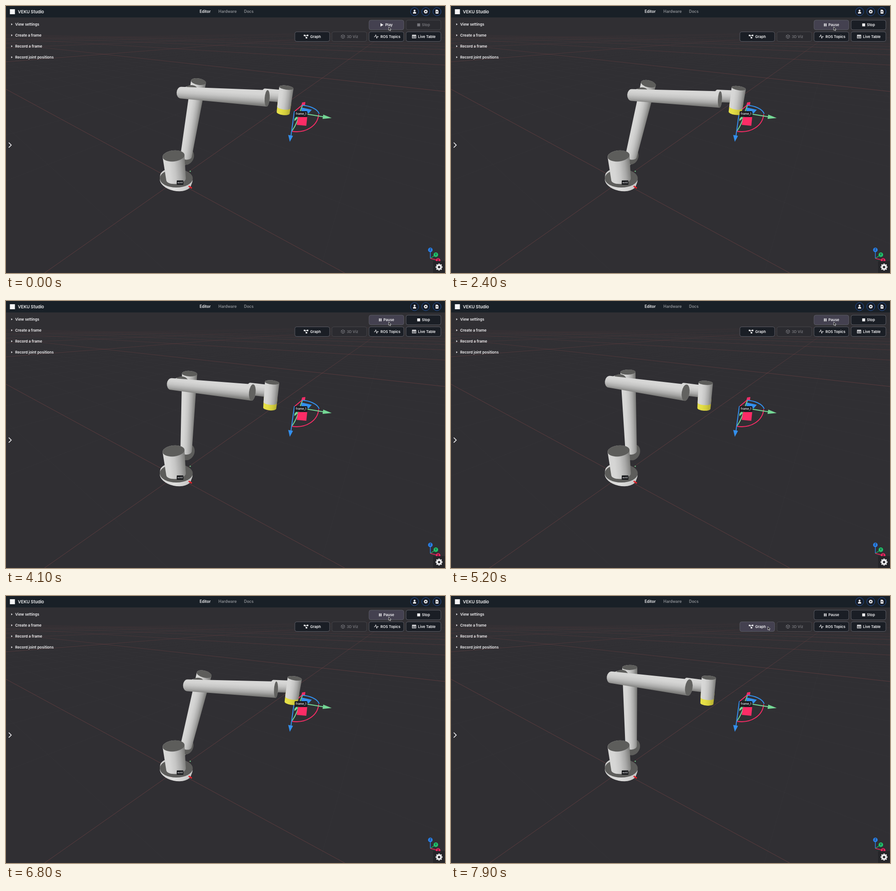
These frames come from a looping animation (959x584 px, 8 s). An HTML page with a canvas:

```html
<!DOCTYPE html>
<html lang="en">
<head>
<meta charset="utf-8">
<title>Robot arm viewer</title>
<style>
html, body { margin: 0; width: 100%; height: 100%; overflow: hidden; background: #302f33; }
canvas { display: block; width: 959px; height: 584px; }
</style>
</head>
<body>
<canvas id="stage"></canvas>
<script>
const W = 959, H = 584, LOOP = 8000, START = 1800;
const canvas = document.getElementById('stage');
const ctx = canvas.getContext('2d');
const dpr = window.devicePixelRatio || 1;
canvas.width = W * dpr;
canvas.height = H * dpr;

const WHITE = '#f4f4f6', DARK = '#1a1e25', CAP = '#5d5d5b';
const PINK = '#fb2c66', BLUE = '#3390ee', GREEN = '#74d795';
const GREY_STOPS = ['#7c7c7a', '#a9a9a8', '#c6c6c5', '#d5d5d4', '#d8d8d7'];
const YELLOW_STOPS = ['#b3ac33', '#d3cd3c', '#e4de46', '#e8e24a'];

// Sway of the arm: [time, x of the forearm's left edge]
const SWAY = [[1800, 373], [2950, 396], [3200, 393], [4100, 352], [4400, 341],
  [4780, 328], [5200, 337], [6420, 396], [6800, 387], [7900, 341], [8000, 337]];

// Joint positions at three sway values, blended by a parabola
const KEYS = [337, 373, 393];
const POSES = {
  elbow: [[345.5, 176.5], [382, 189.5], [402, 198]],
  wrist: [[512.5, 200.5], [570.5, 202], [597.5, 206.5]],
  linkTop: [[386.5, 155.5], [420.5, 165.5], [438, 173.5]],
  toolTop: [[556.5, 179], [612.5, 178.5], [638, 181]],
  toolEnd: [[552.5, 235], [605.5, 233.5], [629.5, 233]],
  caps: [[8.5, 5.5], [5.5, 7], [3.8, 8]],
  shoulder: [[398, 331], [395.5, 330], [394, 329]]
};

function swayAt(t) {
  if (t <= START) return SWAY[0][1];
  const slope = i => (SWAY[i + 1][1] - SWAY[i][1]) / (SWAY[i + 1][0] - SWAY[i][0]);
  const tangent = i => {
    if (i === 0) return 0;
    if (i === SWAY.length - 1) return slope(i - 1);
    const a = slope(i - 1), b = slope(i);
    return a * b <= 0 ? 0 : (a + b) / 2;
  };
  let i = 0;
  while (i < SWAY.length - 2 && t > SWAY[i + 1][0]) i++;
  const [t0, x0] = SWAY[i], [t1, x1] = SWAY[i + 1];
  const d = t1 - t0, s = (t - t0) / d, s2 = s * s, s3 = s2 * s;
  return (2 * s3 - 3 * s2 + 1) * x0 + (s3 - 2 * s2 + s) * d * tangent(i)
    + (3 * s2 - 2 * s3) * x1 + (s3 - s2) * d * tangent(i + 1);
}

function poseAt(x) {
  const weights = KEYS.map((k, i) => KEYS.reduce(
    (w, m, j) => i === j ? w : w * (x - m) / (k - m), 1));
  const pose = {};
  for (const name in POSES) {
    pose[name] = [0, 1].map(c => weights.reduce((sum, w, i) => sum + w * POSES[name][i][c], 0));
  }
  return pose;
}

const mix = (a, b, s) => [a[0] + (b[0] - a[0]) * s, a[1] + (b[1] - a[1]) * s];
const shift = (p, dx, dy) => [p[0] + dx, p[1] + dy];

function ellipse(p, rx, ry, color, angle = 0) {
  ctx.beginPath();
  ctx.ellipse(p[0], p[1], rx, ry, angle, 0, Math.PI * 2);
  ctx.fillStyle = color;
  ctx.fill();
}

function poly(color, ...points) {
  ctx.beginPath();
  points.forEach(p => ctx.lineTo(p[0], p[1]));
  ctx.closePath();
  ctx.fillStyle = color;
  ctx.fill();
}

function line(color, width, ...points) {
  ctx.beginPath();
  points.forEach(p => ctx.lineTo(p[0], p[1]));
  ctx.strokeStyle = color;
  ctx.lineWidth = width;
  ctx.stroke();
}

function curve(color, a, c, d, b) {
  ctx.beginPath();
  ctx.moveTo(...a);
  ctx.bezierCurveTo(...c, ...d, ...b);
  ctx.strokeStyle = color;
  ctx.lineWidth = 2;
  ctx.stroke();
}

function box(x, y, w, h, r, fill, stroke) {
  ctx.beginPath();
  ctx.roundRect(x, y, w, h, r);
  ctx.fillStyle = fill;
  ctx.fill();
  if (stroke) {
    ctx.strokeStyle = stroke;
    ctx.lineWidth = 1;
    ctx.stroke();
  }
}

function text(str, x, y, size, color = WHITE, align = 'left', weight = 600) {
  ctx.font = `${weight} ${size}px Inter, "Open Sans", sans-serif`;
  ctx.textAlign = align;
  ctx.textBaseline = 'middle';
  ctx.fillStyle = color;
  ctx.fillText(str, x, y);
}

// Cylinder from a to b: r is the half width, k the depth of the end ellipse
function cylinder(a, ra, ka, b, rb, kb, cap, stops = GREY_STOPS) {
  const angle = Math.atan2(b[1] - a[1], b[0] - a[0]);
  const m = mix(a, b, 0.5), r = (ra + rb) / 2;
  // Shade from the right or lower side to the lit left or upper side
  const side = Math.cos(angle) > 0.7 ? -1 : 1;
  const nx = -Math.sin(angle) * r * side, ny = Math.cos(angle) * r * side;
  const shade = ctx.createLinearGradient(m[0] - nx, m[1] - ny, m[0] + nx, m[1] + ny);
  stops.forEach((c, i) => shade.addColorStop(i / (stops.length - 1), c));
  ctx.beginPath();
  ctx.ellipse(a[0], a[1], ka, ra, angle, Math.PI / 2, Math.PI * 1.5);
  ctx.ellipse(b[0], b[1], kb, rb, angle, -Math.PI / 2, Math.PI / 2);
  ctx.closePath();
  ctx.fillStyle = shade;
  ctx.fill();
  if (cap) ellipse(a, ka, ra, cap, angle);
}

function drawGrid() {
  const horizon = 57;
  const fade = rgb => {
    const g = ctx.createLinearGradient(0, horizon, 0, 200);
    g.addColorStop(0, `rgba(${rgb},0.05)`);
    g.addColorStop(0.3, `rgba(${rgb},0.6)`);
    g.addColorStop(1, `rgba(${rgb},1)`);
    return g;
  };
  const family = (vx, x0, step, from, to, color, width) => {
    for (let i = from; i <= to; i++) line(color, width, [vx, horizon], [x0 + step * i, H]);
  };
  ctx.globalAlpha = 0.014;
  const minor = fade('255,255,255');
  family(-230, 740, 385, -2, 50, minor, 1);
  family(834, 84, 600.6, -45, 30, minor, 1);
  ctx.globalAlpha = 0.38;
  const major = fade('178,78,78');
  family(-230, 740, 3850, 0, 6, major, 0.85);
  family(834, 84, 6006, -5, 2, major, 0.85);
  ctx.globalAlpha = 1;
}

function drawFrameHandle() {
  line(PINK, 2, [649, 215], [631, 230]);
  poly(PINK, [647, 211], [654, 210], [653, 217], [645, 218]);
  curve(GREEN, [648, 217], [640, 232], [640, 252], [625, 273]);
  curve(BLUE, [647, 217], [662, 218], [681, 225], [684, 236]);
  curve(PINK, [683, 237], [681, 262], [655, 279], [624, 274]);
  poly(BLUE, [646, 222], [668, 227], [661, 235], [645, 231]);
  poly(GREEN, [630, 247], [637, 239], [637, 246], [630, 252]);
  poly(PINK, [638, 243], [658, 243], [656, 262], [635, 260]);
  line(BLUE, 2, [630, 230], [622.5, 284]);
  poly(BLUE, [616.5, 282], [627, 284], [620, 297]);
  line(GREEN, 2, [652, 235.5], [694, 242.5]);
  poly(GREEN, [693, 237.5], [711.5, 245], [691.5, 247]);
}

function drawArm(p) {
  cylinder([372, 377], 36, 20, [370.5, 384], 35, 20.5, null, ['#c6c6c5', '#dededd', '#cfcfce']);
  ellipse([372, 377], 36, 20, CAP);
  line('#e3222c', 3, [399, 394], [406, 398.5]);
  ellipse([402.5, 361.5], 1.3, 1.3, '#6fd08f');

  ellipse([389, 341], 5, 8, '#cfcfce');
  ellipse(p.shoulder, 14.5, 18, CAP, 0.45);
  cylinder(p.linkTop, 16.5, p.caps[1], [393.5, 328], 12.5, 8, CAP);
  cylinder([366, 328], 24, 12, [371.5, 379], 21.5, 10, CAP);

  ellipse(shift(p.elbow, 16, -3), 11, 11, '#d4d4d3');
  ellipse(shift(p.elbow, 23, -4), 15, 12.5, CAP);

  drawFrameHandle();
  cylinder(shift(p.wrist, -6, -8), 13.5, 6.5, mix(p.toolTop, p.toolEnd, 0.35), 13.5, 4);
  cylinder(p.wrist, 18, p.caps[0], p.elbow, 12.8, 9.3, '#626260');
  cylinder(mix(p.toolTop, p.toolEnd, 0.6), 15, 4, p.toolEnd, 14.3, 5, null, YELLOW_STOPS);
  cylinder(p.toolTop, 15.7, 4.5, mix(p.toolTop, p.toolEnd, 0.79), 14.6, 4.5, CAP);
}

function gear(x, y, r, hole) {
  ellipse([x, y], r * 0.76, r * 0.76, WHITE);
  for (let i = 0; i < 4; i++) {
    const a = i * Math.PI / 4, c = Math.cos(a) * r, s = Math.sin(a) * r;
    line(WHITE, r * 0.42, [x - c, y - s], [x + c, y + s]);
  }
  ellipse([x, y], r * 0.34, r * 0.34, hole);
}

const ICONS = {
  play(x, y, c) { poly(c, [x - 3, y - 3.7], [x + 3.5, y], [x - 3, y + 3.7]); },
  pause(x, y, c) {
    ctx.fillStyle = c;
    ctx.fillRect(x - 2.7, y - 3.2, 2, 6.4);
    ctx.fillRect(x + 0.7, y - 3.2, 2, 6.4);
  },
  stop(x, y, c) {
    ctx.fillStyle = c;
    ctx.fillRect(x - 3.2, y - 3.2, 6.4, 6.4);
  },
  graph(x, y, c) {
    line(c, 1, [x - 3, y - 2.3], [x + 3, y - 2.3]);
    line(c, 1, [x - 3, y - 2.3], [x + 1, y + 2.7]);
    ctx.fillStyle = c;
    [[-5, -4], [1.5, -4], [-0.8, 1]].forEach(([dx, dy]) => ctx.fillRect(x + dx, y + dy, 3.4, 3.2));
  },
  cube(x, y, c) {
    line(c, 1, [x, y - 4], [x + 3.7, y - 2], [x + 3.7, y + 2.2], [x, y + 4.2],
      [x - 3.7, y + 2.2], [x - 3.7, y - 2], [x, y - 4]);
    line(c, 1, [x - 3.7, y - 2], [x, y], [x + 3.7, y - 2]);
    line(c, 1, [x, y], [x, y + 4.2]);
  },
  pulse(x, y, c) {
    line(c, 1, [x - 5, y + 0.5], [x - 3, y + 0.5], [x - 1.3, y - 4], [x + 1, y + 4],
      [x + 2.5, y - 1], [x + 3.3, y + 0.5], [x + 5, y + 0.5]);
  },
  table(x, y, c) {
    ctx.strokeStyle = c;
    ctx.lineWidth = 1;
    ctx.strokeRect(x - 4, y - 3.2, 8, 6.6);
    line(c, 2, [x - 4, y - 2.5], [x + 4, y - 2.5]);
    line(c, 1, [x - 4, y + 0.6], [x + 4, y + 0.6]);
    line(c, 1, [x, y - 3], [x, y + 3]);
  }
};

function button(label, icon, x, y, iconX, textX, state) {
  const off = state === 'off';
  const fill = { off: '#2b2b30', hover: '#444150', on: DARK }[state];
  const ink = off ? '#77777c' : WHITE;
  box(x + 0.5, y + 0.5, 76, 21, 4, fill, off ? '#454549' : '#5b5c65');
  ICONS[icon](iconX, y + 10.8, ink);
  text(label, textX, y + 11.2, 7.9, ink);
}

function drawHeader() {
  ctx.fillStyle = '#192027';
  ctx.fillRect(0, 0, W, 25);
  ctx.fillStyle = WHITE;
  ctx.fillRect(8.5, 7, 11, 11);
  text('VEKU Studio', 26, 13.2, 9.3);
  text('Editor', 435, 12, 8.5, WHITE, 'center');
  text('Hardware', 484, 12, 8.5, '#8b8e93', 'center');
  text('Docs', 530.5, 12, 8.5, '#8b8e93', 'center');

  [892.5, 917, 941.5].forEach(x => {
    ctx.beginPath();
    ctx.arc(x, 12.3, 8.8, 0, Math.PI * 2);
    ctx.fillStyle = '#141a25';
    ctx.fill();
    ctx.strokeStyle = '#2757a3';
    ctx.lineWidth = 1;
    ctx.stroke();
  });
  ellipse([892.5, 10.2], 2, 2.1, WHITE);
  box(889, 12.8, 7, 3.6, [3, 3, 0.5, 0.5], WHITE);
  gear(917, 12.3, 4.3, '#141a25');
  poly(WHITE, [938.5, 8], [942.3, 8], [944.6, 10.3], [944.6, 16.7], [938.5, 16.7]);
  line('#141a25', 0.9, [940, 12.5], [943.2, 12.5]);
  line('#141a25', 0.9, [941.6, 11], [941.6, 14.2]);
}

function drawMenu() {
  ['View settings', 'Create a frame', 'Record a frame', 'Record joint positions'].forEach((label, i) => {
    const y = 40 + i * 24;
    poly(WHITE, [11.5, y - 2.2], [14.2, y], [11.5, y + 2.2]);
    text(label, 20, y + 0.3, 8.05);
  });
  line(WHITE, 1.6, [6, 298.8], [11.5, 304.2], [6, 309.6]);
}

function drawButtons(t, cursor) {
  const running = t >= START;
  const state = (x, y) => cursor[0] >= x && cursor[0] <= x + 77 && cursor[1] >= y && cursor[1] <= y + 22
    ? 'hover' : 'on';
  if (running) button('Pause', 'pause', 792.5, 30.5, 817.5, 824.5, state(792, 30));
  else button('Play', 'play', 792.5, 30.5, 821, 828.5, state(792, 30));
  button('Stop', 'stop', 873.5, 30.5, 901.5, 908.5, running ? 'on' : 'off');
  button('Graph', 'graph', 630.5, 56, 655.5, 664.5, state(630, 56));
  button('3D Viz', 'cube', 711.5, 56, 736, 744.5, 'off');
  button('ROS Topics', 'pulse', 792.5, 56, 809, 818, 'on');
  button('Live Table', 'table', 873.5, 56, 891.5, 900, 'on');
}

function drawCompass() {
  const o = [927, 552];
  [[927, 533.5, '#2a80e8', 'Z'], [939, 544, '#1fc46b', 'Y'], [944, 556.5, '#f0245f', 'X']].forEach(([x, y, c, name]) => {
    line(c, 1.5, o, [x, y]);
    ellipse([x, y], 5, 5, c);
    text(name, x, y + 0.3, 5.5, '#16202c', 'center');
  });
  ctx.fillStyle = '#252529';
  ctx.fillRect(933, 558, 26, 26);
  gear(946, 571, 7.5, '#252529');
}

function cursorAt(t) {
  const s = Math.min(1, Math.max(0, (t - 7000) / 650));
  return mix([836, 46], [692, 67], s * s * (3 - 2 * s));
}

function drawCursor([x, y]) {
  const points = [[0, 0], [0, 7.2], [1.8, 5.7], [3, 8.2], [4.2, 7.7], [3.1, 5.2], [5.3, 5]];
  const outline = points.map(([dx, dy]) => [x + dx, y + dy]);
  poly('#111', ...outline);
  line('#f0f0f0', 0.8, ...outline, outline[0]);
}

function draw(t) {
  const cursor = cursorAt(t);
  ctx.setTransform(dpr, 0, 0, dpr, 0, 0);
  ctx.fillStyle = '#302f33';
  ctx.fillRect(0, 0, W, H);
  drawGrid();
  drawArm(poseAt(swayAt(t)));
  box(373, 381.5, 14.5, 9.5, 1, '#17181b');
  text('world', 380.2, 386.4, 4.3, WHITE, 'center', 500);
  box(630.5, 230, 28, 12.5, 2, '#1a1b1f');
  text('frame_1', 644.5, 236.3, 6.4, WHITE, 'center', 500);
  drawHeader();
  drawMenu();
  drawButtons(t, cursor);
  drawCompass();
  drawCursor(cursor);
}

const origin = performance.now();
function tick() {
  const t = (performance.now() - origin) % LOOP;
  draw(Math.floor(t / 100) * 100);
  requestAnimationFrame(tick);
}
tick();
</script>
</body>
</html>
```
